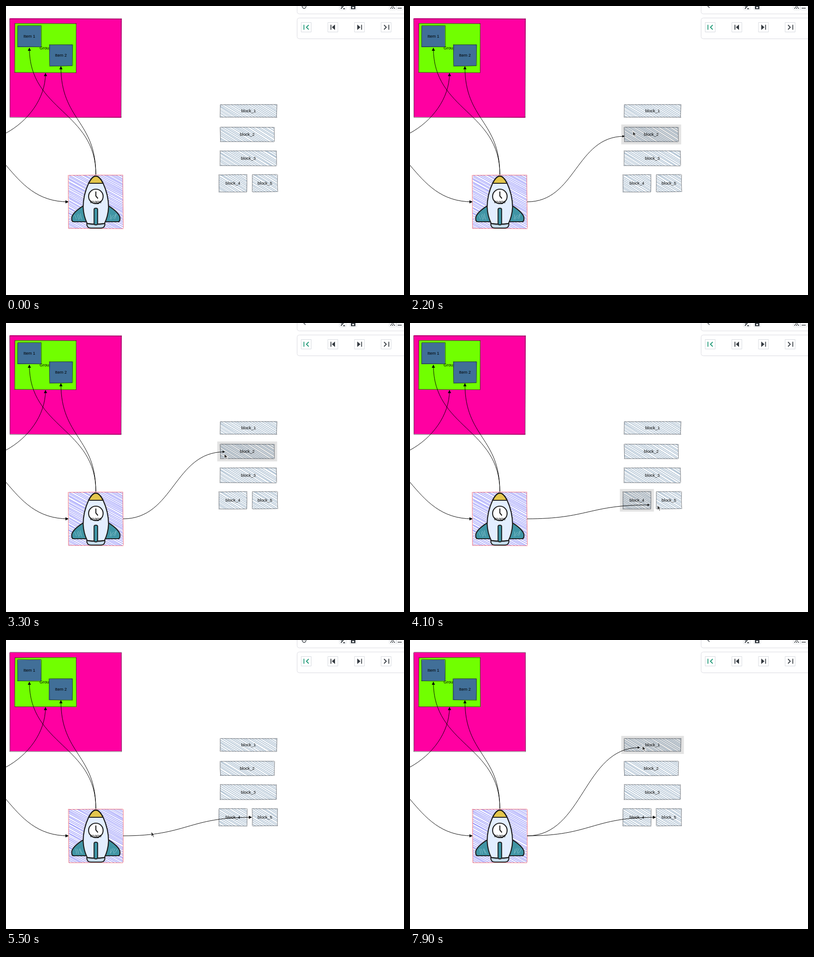
An HTML page with a canvas for the animation above (8000 ms loop, 877 px wide and 639 px high).

```html
<!DOCTYPE html>
<html lang="en">
<head>
<meta charset="utf-8">
<title>Sketch diagram editor</title>
<style>
  html, body { margin: 0; width: 100%; height: 100%; overflow: hidden; background: #fff; }
  canvas { display: block; }
</style>
</head>
<body>
<canvas id="stage" width="877" height="639"></canvas>
<script>
const ctx = document.getElementById('stage').getContext('2d');
const LOOP = 8000, STEP = 100, TIP_LAG = 33;
const RELEASE = 4900, FIRST_CONNECT = 1100, SECOND_CONNECT = 7300;
const INK = '#343a40', GREEN = '#1a9673', PANEL = '#d9d9e0';

// Boxes are [left, top, right, bottom].
const IMAGE = [138, 374, 258, 492];
const BLOCKS = [
  [472, 218, 597, 246], [472, 268, 591, 300], [472, 320, 596, 353],
  [469, 373, 531, 411], [543, 373, 598, 411]
];
const SOLIDS = [
  { color: '#ff00a1', box: [8.5, 28, 254.5, 246.5] },
  { color: '#71ff00', box: [19.5, 38.5, 154.5, 147.5], label: 'Group' },
  { color: '#416f98', box: [25.5, 43.5, 77.5, 90.5], label: 'Item 1' },
  { color: '#416f98', box: [95.5, 85.5, 146.5, 132.5], label: 'Item 2' }
];

// Pauses and turns of the pointer: [time, x, y].
const STOPS = [
  [800, -10, 470], [1500, 238, 432], [2000, 244, 430], [2200, 491, 277],
  [2400, 590, 251], [2800, 590, 251], [3100, 500, 232], [3300, 481, 289],
  [4000, 480, 400], [4100, 545, 403], [4900, 562, 394], [5500, 320, 424],
  [6200, 67, 382], [7000, 67, 382], [7100, 65, 327], [7500, 234, 430], [7900, 512, 234]
];

function pointerAt(time) {
  const next = STOPS.findIndex(stop => stop[0] > time);
  if (next < 1) return STOPS.at(next).slice(1);
  const [t0, x0, y0] = STOPS[next - 1], [t1, x1, y1] = STOPS[next];
  const u = (time - t0) / (t1 - t0), k = u * u * (3 - 2 * u);
  return [x0 + (x1 - x0) * k, y0 + (y1 - y0) * k];
}

let seed = 1;
function jitter(size) {
  seed = (Math.imul(seed, 1664525) + 1013904223) >>> 0;
  return (seed / 2 ** 32 * 2 - 1) * size;
}

function polygon(points, fill) {
  ctx.beginPath();
  for (const [x, y] of points) ctx.lineTo(x, y);
  ctx.closePath();
  ctx.fillStyle = fill;
  ctx.fill();
}

function path(d, stroke, width, fill) {
  const shape = new Path2D(d);
  if (fill) { ctx.fillStyle = fill; ctx.fill(shape); }
  if (stroke) { ctx.strokeStyle = stroke; ctx.lineWidth = width; ctx.stroke(shape); }
}

function roughLine([x0, y0], [x1, y1], wobble) {
  ctx.beginPath();
  ctx.moveTo(x0 + jitter(wobble), y0 + jitter(wobble));
  ctx.quadraticCurveTo((x0 + x1) / 2 + jitter(wobble), (y0 + y1) / 2 + jitter(wobble),
    x1 + jitter(wobble), y1 + jitter(wobble));
  ctx.stroke();
}

const corners = ([l, t, r, b]) => [[l, t], [r, t], [r, b], [l, b]];

function roughOutline(box, color, width) {
  ctx.strokeStyle = color;
  ctx.lineWidth = width;
  for (let pass = 0; pass < 2; pass++) {
    corners(box).forEach((from, i, all) => roughLine(from, all[(i + 1) % 4], 1));
  }
}

function hatch([l, t, r, b], color, width, gap, slope) {
  ctx.save();
  ctx.beginPath();
  ctx.rect(l, t, r - l, b - t);
  ctx.clip();
  ctx.strokeStyle = color;
  ctx.lineWidth = width;
  const drop = (r - l) * slope;
  for (let y = t - drop; y < b; y += gap) {
    for (let pass = 0; pass < 2; pass++) roughLine([l, y], [r, y + drop], 1.4);
  }
  ctx.restore();
}

function label(text, [l, t, r, b]) {
  ctx.fillStyle = '#000';
  ctx.font = '9.4px "Liberation Sans", Arial, sans-serif';
  ctx.textAlign = 'center';
  ctx.fillText(text, (l + r) / 2, (t + b) / 2 + 3.1);
}

// The head's tip is the end of the curve.
function arrowHead(x, y, dx, dy, size) {
  const bx = x - dx * size, by = y - dy * size, half = size / 2;
  polygon([[x, y], [bx - dy * half, by + dx * half], [bx + dy * half, by - dx * half]], '#000');
}

function edgeRight(x0, y0, x, y, size = 7) {
  const mid = (x0 + x) / 2;
  path(`M${x0} ${y0}C${mid} ${y0} ${mid} ${y} ${x - 1} ${y}`, '#000', 1);
  arrowHead(x, y, 1, 0, size);
}

function edgeUp(x0, y0, x, y) {
  const mid = (y0 + y) / 2;
  path(`M${x0} ${y0}C${x0} ${mid} ${x} ${mid} ${x} ${y + 1}`, '#000', 1);
  arrowHead(x, y, 0, -1, 7);
}

function wing(side, line) {
  const outline = 'M28 442Q50 456 53 467Q54 477 49 477H20Z';
  ctx.save();
  ctx.translate(198, 0);
  ctx.scale(side, 1);
  path(outline, line, 2.2, '#4095a5');
  ctx.strokeStyle = '#b9dde4';
  ctx.lineWidth = 0.6;
  for (let x = 30; x < 46; x += 4) roughLine([x, 471], [x + 4, 461], 2);
  ctx.restore();
}

function rocket() {
  const line = '#1e1e1e';
  const body = 'M198 376Q206 376 214 392Q226 418 226 445Q225 465 217 481Q198 484 179 481Q171 465 170 445Q170 418 182 392Q190 376 198 376Z';
  ctx.save();
  ctx.lineJoin = ctx.lineCap = 'round';
  path('M178 481Q178 491 187 491H209Q218 491 218 481Z', line, 2, '#c5dcec');
  wing(1, line);
  wing(-1, line);
  path(body, null, 0, '#e3eeff');
  path('M182 392Q190 376 198 376Q206 376 214 392Z', line, 2.2, '#e3c64c');
  path(body, line, 2.3);
  path('M182 421A16 16 0 1 1 214 421A16 16 0 1 1 182 421Z', line, 2.2, '#fff');
  path('M198 411V420L202 425', line, 2.2);
  path('M194 450Q194 447 198 447Q202 447 202 450V480Q202 484 198 484Q194 484 194 480Z', line, 2, '#4095a5');
  ctx.restore();
}

function drawDiagram(redrawn) {
  seed = redrawn ? 77 : 19;
  for (const { color, box, label: text } of SOLIDS) {
    polygon(corners(box).map(([x, y]) => [x + jitter(1), y + jitter(1)]), color);
    roughOutline(box, 'rgba(0,0,0,.5)', 0.7);
    if (text) label(text, box);
  }
  BLOCKS.forEach((box, i) => {
    hatch(box, '#5d83a5', 0.5, 4.2, 0.62);
    roughOutline(box, 'rgba(30,35,45,.7)', 0.5);
    label('block_' + (i + 1), box);
  });
  hatch(IMAGE, '#6a6af8', 0.6, 3.8, 0.55);
  roughOutline(IMAGE, 'rgba(240,50,60,.7)', 0.6);
  rocket();
  label('image', IMAGE);

  edgeUp(198, 373, 51.5, 92);
  edgeUp(198, 373, 121, 133);
  path('M0 281C48 255 87 205 87 149', '#000', 1);
  arrowHead(87, 148, 0, -1, 7);
  edgeRight(-138, 271, 138, 433);
}

function panel(x, y, w, h, radius, color) {
  ctx.beginPath();
  ctx.roundRect(x, y, w, h, radius);
  ctx.fillStyle = '#fff';
  ctx.fill();
  ctx.strokeStyle = color;
  ctx.lineWidth = 1;
  ctx.stroke();
}

function drawToolbar(connecting) {
  panel(641.5, -30.5, 260, 48, 5, PANEL);
  panel(641.5, 26.5, 260, 46, 5, PANEL);
  for (const x of [734.5, 757.5, 844.5, 860.5]) panel(x, -6.5, 15, 15, 1, '#dde0e4');

  path(connecting ? 'M655 -1L660 4' : 'M652 0L654 4Q657 7 660 4L662 -1M655 1V-3M658 1V-3', INK, 1.3);
  path('M738 6L746 -3M743 6H747M737 -1L740 1', INK, 2);
  path('M760 -4H770V7H760ZM763 2V5H767V2Z', null, 0, INK);
  ctx.fillStyle = INK;
  for (let row = 0; row < 3; row++) {
    for (let i = 0; i <= row; i++) ctx.fillRect(851 - row * 2 + i * 4, row * 2.5 - 1, 2, 2);
  }
  ctx.fillRect(863, 4, 9, 1.5);

  for (let i = 0; i < 4; i++) panel(650.5 + i * 58.7, 36.5, 22, 21, 0, '#d5d8de');
  path('M656.5 41.5V52.5M667 42L662 47L667 52', GREEN, 1.8);
  path('M716 41.5V52.5M783.5 41.5V52.5M833 42L838 47L833 52M843.5 41.5V52.5', INK, 1.8);
  path('M725 41L718 47L725 53ZM774 41L781 47L774 53Z', null, 0, INK);
}

function drawPointer([x, y]) {
  ctx.save();
  ctx.translate(x, y);
  path('M0 0V10.5L2.6 8.2L4.6 12.6L6.4 11.8L4.5 7.5H8Z', 'rgba(255,255,255,.8)', 1.2, '#2b2b2b');
  ctx.restore();
}

const contains = ([l, t, r, b], [x, y]) => x >= l && x <= r && y >= t && y <= b;

function drawConnecting(tip) {
  const hovered = [IMAGE, ...BLOCKS].find(box => contains(box, tip));
  if (hovered) {
    const [l, t, r, b] = hovered;
    ctx.fillStyle = 'rgba(0,0,0,.11)';
    ctx.fillRect(l - 6.5, t - 6, r - l + 13, b - t + 12);
  }
  if (tip[0] > IMAGE[2]) edgeRight(258, 433, ...tip, 5);
}

function draw(time) {
  const connected = time >= RELEASE;
  const connecting = (time >= FIRST_CONNECT && !connected) || time >= SECOND_CONNECT;

  ctx.fillStyle = '#fff';
  ctx.fillRect(0, 0, 877, 639);
  drawDiagram(connected);
  if (connected) edgeRight(258, 433, 542, 392);
  if (connecting) drawConnecting(pointerAt(time - TIP_LAG));
  drawToolbar(connecting);
  drawPointer(pointerAt(time));
}

const start = performance.now();
function tick() {
  const time = (performance.now() - start) % LOOP;
  draw(Math.floor(time / STEP) * STEP);
  requestAnimationFrame(tick);
}
tick();
</script>
</body>
</html>
```
